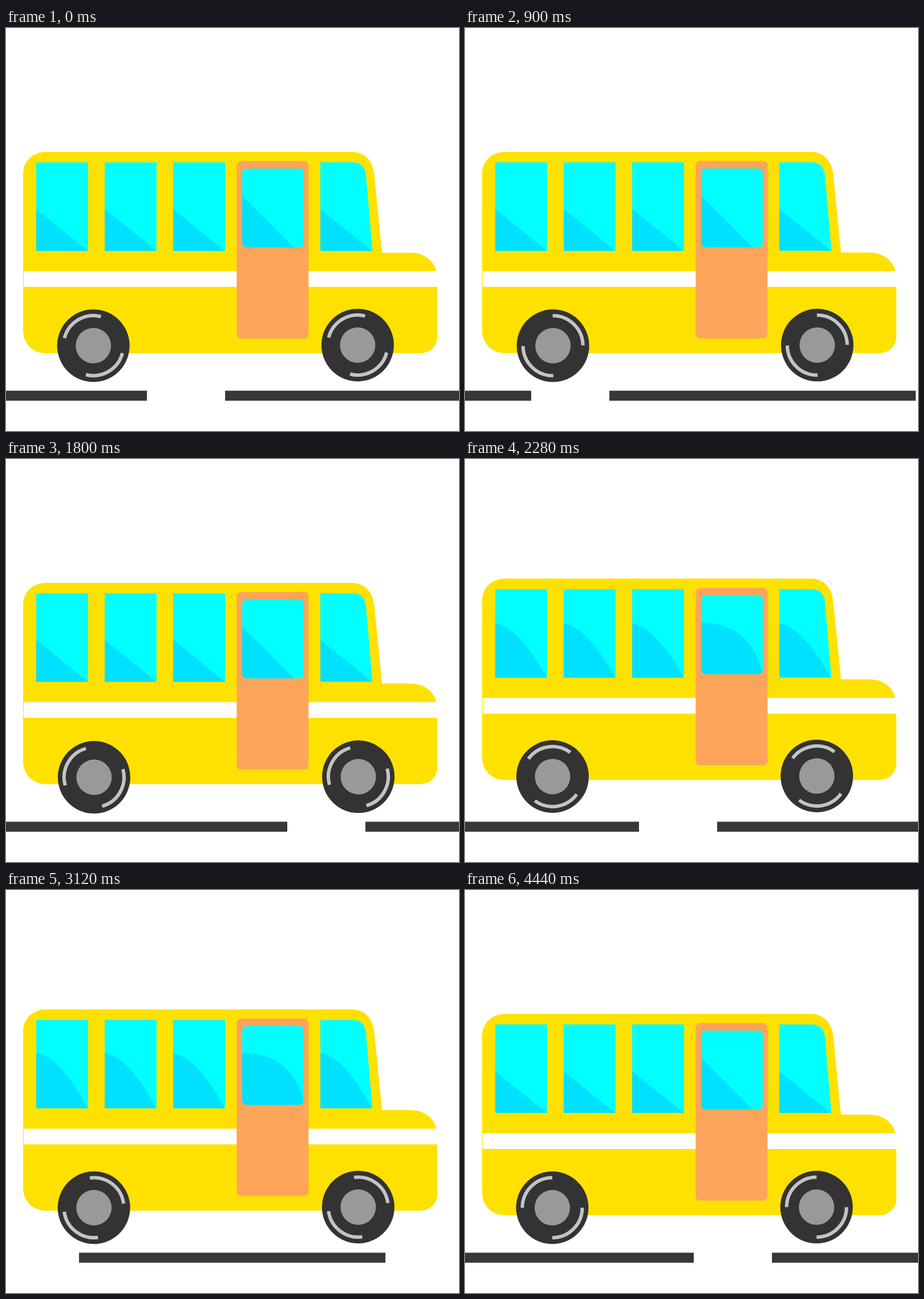
Animation, 794 px wide and 705 px high, one loop 4.5 s. Source, as an HTML page:

```html
<!DOCTYPE html>
<html lang="en">
<head>
<meta charset="utf-8">
<title>Bus on the road</title>
<style>
  html, body { margin: 0; width: 100%; height: 100%; overflow: hidden; background: #fff; }
  svg { display: block; width: 794px; height: 705px; }
</style>
</head>
<body>
<svg viewBox="0 0 794 705" xmlns="http://www.w3.org/2000/svg">
  <defs>
    <clipPath id="frontClip">
      <path id="front" d="M551 235.2H607Q629 235.2 631 258L642.3 390H551Z"/>
    </clipPath>
    <clipPath id="doorClip"><rect x="414" y="246" width="108" height="138" rx="8"/></clipPath>
    <g id="wheel">
      <circle r="63.5" fill="#333"/>
      <circle r="31" fill="#999"/>
      <path d="M-52.5 0A52.5 52.5 0 0 1 0 -52.5M52.5 0A52.5 52.5 0 0 1 0 52.5"
            fill="none" stroke="#c4c4c4" stroke-width="6"/>
    </g>
  </defs>

  <path id="road" fill="#383838"/>

  <g id="bus">
    <path fill="#ffe100" d="M30 256C30 233 47 216.8 70 216.8H606C628 216.8 643 232 645.5 256L659 393H709C733 393 751 407 755 428L756 440V540C756 557 743 569 726 569H70C47 569 30 552 30 529Z"/>
    <rect x="31" y="425.5" width="726" height="27.5" fill="#fff"/>
    <g fill="#0ff">
      <rect x="53" y="235.2" width="91" height="154.8"/>
      <rect x="173" y="235.2" width="91" height="154.8"/>
      <rect x="293" y="235.2" width="91" height="154.8"/>
      <use href="#front"/>
    </g>
    <rect x="404.3" y="232.7" width="126" height="310.8" rx="8" fill="#fca55a"/>
    <rect x="414" y="246" width="108" height="138" rx="8" fill="#0ff"/>
    <g fill="#00e1ff">
      <path id="sideShine"/>
      <path id="frontShine" clip-path="url(#frontClip)"/>
      <path id="doorShine" clip-path="url(#doorClip)"/>
    </g>
  </g>

  <use id="rear" href="#wheel"/>
  <use id="fore" href="#wheel"/>
</svg>
<script>
  const LOOP = 4500, STEP = 60, LAST = 74;
  const DASH = 537, GAP = 137, PERIOD = DASH + GAP;
  const el = id => document.getElementById(id);
  const mix = (a, b, k) => a + (b - a) * k;

  // Road travel: slow at both ends of the loop, fastest in the middle.
  function travel(n) {
    const x = n - 37.2;
    return 597 + 23.713 * x - 0.005535 * x ** 3;
  }

  function roadPath(n) {
    const gap = Math.round(247 - travel(n));
    let x = gap + GAP, d = "";
    while (x > -DASH) x -= PERIOD;
    for (; x < 794; x += PERIOD) {
      const a = Math.max(0, x), b = Math.min(794, x + DASH);
      if (b > a) d += `M${a} 634.5H${b}V652H${a}Z`;
    }
    return d;
  }

  // A straight diagonal at rest, bulging into an arc as k goes to 1.
  function shine(x, k) {
    return `M${x} ${mix(317, 292.8, k)}Q${x + mix(45, 42, k)} ${mix(353.5, 299.8, k)} ${x + 90.5} 390H${x}Z`;
  }

  function doorShine(k) {
    return `M414 ${mix(294, 293, k)}Q${mix(459, 505, k)} ${mix(339, 293, k)} ${mix(504, 523, k)} 384H414Z`;
  }

  function draw(ms) {
    const n = Math.floor((ms % LOOP) / STEP);
    const p = (n + 0.5) / (LAST + 0.5);
    const lift = (1 - Math.cos(p * 10 * Math.PI)) / 2;
    const turn = p * 2160;

    el("road").setAttribute("d", roadPath(n));
    el("bus").setAttribute("transform", `translate(0 ${-8 * lift})`);
    el("sideShine").setAttribute("d", [53, 173, 293].map(x => shine(x, lift)).join(""));
    el("frontShine").setAttribute("d", shine(551, lift));
    el("doorShine").setAttribute("d", doorShine(lift));

    // The wheels sit slightly off their axles.
    const spin = `rotate(${turn}) translate(-0.6 -0.6)`;
    el("rear").setAttribute("transform", `translate(153.6 556.4) ${spin}`);
    el("fore").setAttribute("transform", `translate(616.8 555.4) ${spin}`);
  }

  let start;
  function tick(now) {
    if (start === undefined) start = now;
    draw(Math.max(0, now - start));
    requestAnimationFrame(tick);
  }
  draw(0);
  requestAnimationFrame(tick);
</script>
</body>
</html>
```
